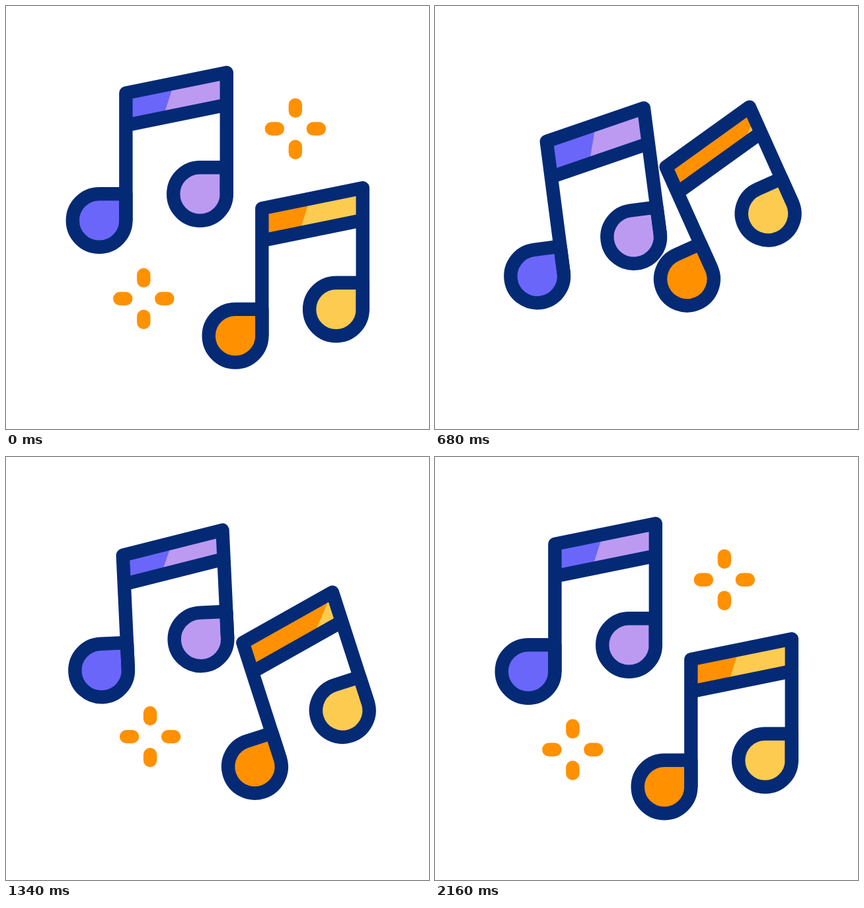
Write an HTML page with a canvas that moves like this. It is 640x640 px and loops after 2620 ms.

```html
<!DOCTYPE html>
<html lang="en">
<head>
<meta charset="utf-8">
<title>Dancing notes</title>
<style>
  html, body { margin: 0; width: 100%; height: 100%; overflow: hidden; background: #fff; }
  canvas { display: block; width: 640px; height: 640px; }
</style>
</head>
<body>
<canvas id="stage"></canvas>
<script>
const LOOP = 2620, SIZE = 640;
const LINE = 20.4, R = 40.3;      // line weight, head radius
const HALF = 76.2;                // half the distance between the stems
const TOP = -100, BEAM = 48.8, HEAD = 92.8;
const RISE = 31 / (2 * HALF);     // slope of the beam
const NAVY = '#042a75', ORANGE = '#ff9100';

const canvas = document.getElementById('stage');
const ctx = canvas.getContext('2d');
const dpr = window.devicePixelRatio || 1;
canvas.width = canvas.height = SIZE * dpr;

// Each note swings about its middle. Turning points: time, drop, turn in degrees, stem stretch.
// "slide" is how far the beam's colours slip for each degree of turn.
const notes = [
  { x: 217.3, y: 231.7, left: '#6b66fa', right: '#bc9af2', slide: 0.6, swing: [
    [0, 0, 0, 0],
    [370, -65, 19.6, -20.5],
    [690, 68, -7.5, 7.7],
    [1085, -39, 12.4, -11.5],
    [1340, 15.2, -2.7, -20.2],
    [1860, 0, 0, 0]
  ] },
  { x: 423.2, y: 406.2, left: ORANGE, right: '#fdcb50', slide: 4, swing: [
    [360, 0, 0, 0],
    [720, -89, -25, -26],
    [1060, 73, 8.8, 15.7],
    [1400, -51, -20.2, -11],
    [1800, 35.8, 18.1, -4],
    [2160, 0, 0, 0]
  ] }
];

// Sparks drift off and later drift home: start time, end time, offset x, offset y.
const sparks = [
  { x: 437.8, y: 185.7, leave: [0, 600, 21, -50], enter: [1642, 2160, -20, 13.2] },
  { x: 208.3, y: 442.8, leave: [160, 560, -18.5, 20], enter: [940, 1680, 22.4, -45] }
];
const RAY_IN = 27, RAY_OUT = 36, RAY_GROWTH = 220;

// Smooth 0 to 1 between two times
function ease(t, from, to) {
  const u = Math.min(1, Math.max(0, (t - from) / (to - from)));
  return u * u * (3 - 2 * u);
}

function pose(swing, t) {
  let i = 0;
  while (i < swing.length - 2 && t >= swing[i + 1][0]) i++;
  const a = swing[i], b = swing[i + 1], p = ease(t, a[0], b[0]);
  return a.slice(1).map((v, k) => v + (b[k + 1] - v) * p);
}

function polygon(points) {
  ctx.beginPath();
  points.forEach(([x, y]) => ctx.lineTo(x, y));
  ctx.closePath();
}

function drawHead(x, y, color) {
  ctx.beginPath();
  ctx.moveTo(x + R, y - R);
  ctx.lineTo(x, y - R);
  ctx.arc(x, y, R, -Math.PI / 2, 0, true);
  ctx.closePath();
  ctx.fillStyle = color;
  ctx.fill();
  ctx.stroke();
}

function drawBeam(x1, x2, top, low, left, right, slip) {
  const edge = LINE / 2;
  const a = Math.max(x1 + edge + 16, x1 + edge + 59 - slip);
  const b = a - 9.7 + slip / 4;
  const ya = top(a) + edge, yb = low(b) - edge;
  const slant = (b - a) / (yb - ya);
  const splitX = y => a + (y - ya) * slant;
  const up = ya - 80, down = yb + 80;

  ctx.save();
  polygon([[x1, top(x1)], [x2, top(x2)], [x2, low(x2)], [x1, low(x1)]]);
  ctx.clip();
  ctx.fillStyle = right;
  ctx.fill();
  polygon([[x1 - 80, up], [splitX(up), up], [splitX(down), down], [x1 - 80, down]]);
  ctx.fillStyle = left;
  ctx.fill();
  ctx.restore();
}

function drawNote({ x, y, left, right, slide, swing }, t) {
  const [drop, turn, stretch] = pose(swing, t);
  const x1 = R - HALF, x2 = R + HALF;
  const y1 = HEAD + stretch, y2 = y1 - 40;
  const height = BEAM + stretch * (stretch > 0 ? 0.7 : 0.25);
  const top = px => TOP - RISE * (px - x1);
  const low = px => top(px) + height;

  ctx.save();
  ctx.translate(x, y + drop);
  ctx.rotate(turn * Math.PI / 180);
  ctx.strokeStyle = NAVY;
  drawBeam(x1, x2, top, low, left, right, slide * turn);
  drawHead(-HALF, y1, left);
  drawHead(HALF, y2, right);
  ctx.beginPath();
  ctx.moveTo(x1, y1);
  ctx.lineTo(x1, top(x1));
  ctx.lineTo(x2, top(x2));
  ctx.lineTo(x2, y2);
  ctx.moveTo(x1, low(x1));
  ctx.lineTo(x2, low(x2));
  ctx.stroke();
  ctx.restore();
}

function drawSpark({ x, y, leave, enter }, t) {
  const entering = t >= enter[0];
  const [from, to, dx, dy] = entering ? enter : leave;
  const p = ease(t, from, to), away = entering ? 1 - p : p;
  const span = RAY_OUT - RAY_IN;
  const start = entering ? RAY_IN : RAY_IN + span * p;
  const end = entering ? RAY_IN + span * ease(t, from, from + RAY_GROWTH) : RAY_OUT;
  if (end - start < 0.05) return;

  ctx.save();
  ctx.translate(x + dx * away, y + dy * away);
  ctx.strokeStyle = ORANGE;
  ctx.beginPath();
  for (const side of [-1, 1]) {
    ctx.moveTo(side * start, 0);
    ctx.lineTo(side * end, 0);
    ctx.moveTo(0, side * start);
    ctx.lineTo(0, side * end);
  }
  ctx.stroke();
  ctx.restore();
}

const begin = performance.now();
function draw() {
  const t = (performance.now() - begin) % LOOP;
  ctx.setTransform(dpr, 0, 0, dpr, 0, 0);
  ctx.fillStyle = '#fff';
  ctx.fillRect(0, 0, SIZE, SIZE);
  ctx.lineWidth = LINE;
  ctx.lineCap = ctx.lineJoin = 'round';
  sparks.forEach(spark => drawSpark(spark, t));
  notes.forEach(note => drawNote(note, t));
  requestAnimationFrame(draw);
}
draw();
</script>
</body>
</html>
```
